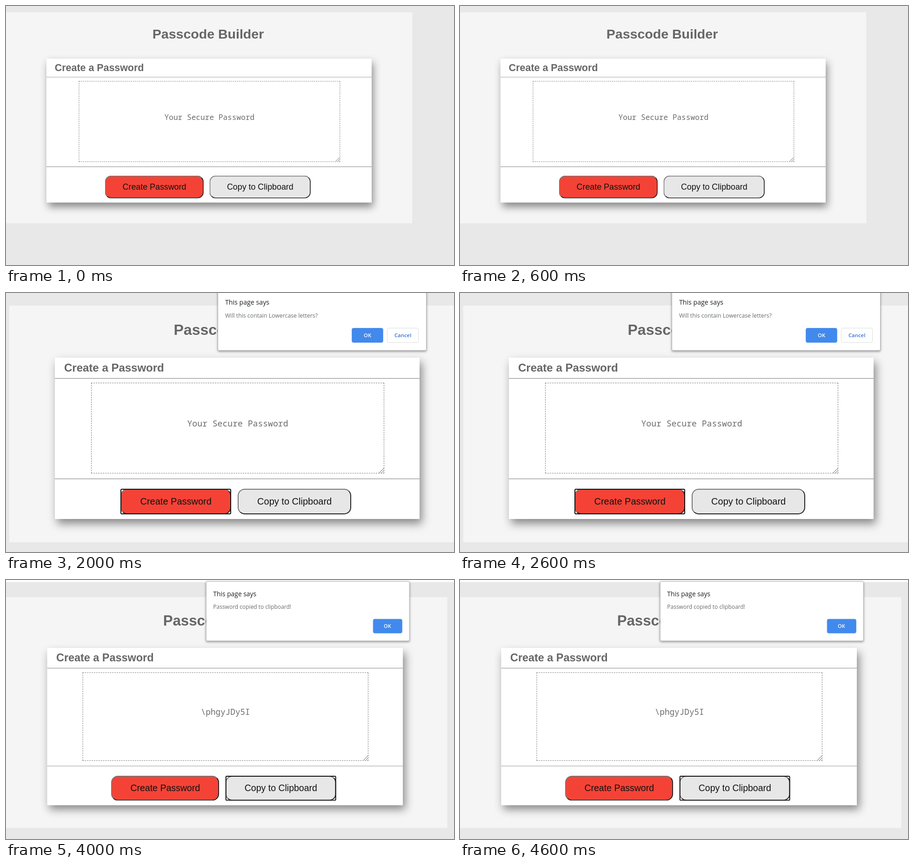
Recreate the animation shown at these times as an HTML page. Size 963x557 px, loop 5 s.

```html
<!DOCTYPE html>
<html lang="en">
<head>
<meta charset="utf-8">
<title>Password tool walkthrough</title>
<style>
  html, body { margin: 0; width: 100%; height: 100%; overflow: hidden; background: #e8e8e8; }
  #stage { position: relative; width: 100%; height: 100%; overflow: hidden; contain: strict; }
  #page { position: absolute; left: 0; top: 0; transform-origin: 0 0; }
  #page * { position: absolute; box-sizing: border-box; }
  #page, .btn { font: 20px "Liberation Sans", Arial, sans-serif; color: #111; }
  .line { line-height: 20px; white-space: pre; }
  .ui { font-family: "Open Sans", "Noto Sans", sans-serif; }

  #toolbar { left: -300px; top: -244px; width: 1500px; height: 100px; background: #fdfdfd; border-bottom: 1px solid #e4e4e4; }
  #address { left: -188px; top: -171px; font-size: 13.1px; color: #444; }
  #panel { left: -98px; top: -112px; width: 980px; height: 509px; background: #f5f5f5; }
  #title { left: 255.5px; top: -70.5px; font-size: 32px; font-weight: bold; color: #666; }

  #card { left: 0; top: 0; width: 784px; height: 347px; background: #fff; box-shadow: 5px 10px 18px #888; }
  #heading { left: 20px; top: 11.7px; font-size: 24px; font-weight: bold; color: #666; }
  .rule { left: 0; width: 784px; height: 2px; border: solid #8e8e8e; border-width: 1px 0; border-bottom-color: #e4e4e4; }
  #field { left: 78px; top: 54px; width: 630px; height: 195px; border: 1px dashed #777; }
  #field svg { right: 0; bottom: 0; }
  #secret { left: 78px; top: 131.2px; width: 630px; text-align: center; font: 18.1px/20px "Noto Sans Mono", "DejaVu Sans Mono", monospace; color: #6c6c6c; }

  .btn { top: 282.3px; height: 55px; line-height: 51px; text-align: center; border-radius: 15px;
    border: 2px solid; border-color: #767676 #222 #222 #767676; }
  #create { left: 141.2px; width: 238px; background: #f44336; }
  #copy { left: 393px; width: 244.3px; background: #e7e7e7; }
  .focus::after { content: ""; position: absolute; inset: -2px; border: 2px solid #101010; border-radius: 3px; }

  #dialog { left: 349.6px; top: -147px; width: 449px; height: 131.5px; background: #fff;
    border: 1px solid #b4b4b4; border-radius: 3px; box-shadow: 0 2px 5px rgba(0, 0, 0, .4); }
  #says { left: 15.3px; top: 17px; font-size: 14.2px; color: #202124; }
  #message { left: 15.3px; top: 46px; font-size: 12.3px; color: #666a6e; }
  #input { left: 15px; top: 93px; width: 417px; height: 33px; border: 2px solid #9cc2f0; border-radius: 3px; }
  #input i { left: 7px; top: 6px; width: 1.2px; height: 17px; background: #222; }
  .answer { bottom: 15.5px; width: 68px; height: 32px; line-height: 30px; font-size: 11.4px; font-weight: 600;
    text-align: center; border: 1px solid #dadce0; border-radius: 4px; }
  #ok { left: 287.5px; background: #4189ec; border-color: #6ca4f0; color: #fff; }
  #cancel { left: 363.5px; color: #3871d8; }

  .prompt #card, .prompt #dialog { background: #fcfcfc; }
  .prompt #dialog { height: 199px; }
  .prompt #ok { background: #1a73e8; border-color: #1a73e8; }
  .alert #ok { left: 367px; width: 65px; }
  .alert #cancel, .plain #dialog, #input { display: none; }
  .prompt #input { display: block; }
</style>
</head>
<body>
<div id="stage">
  <div id="page">
    <div id="toolbar"></div>
    <div id="address" class="line ui">Users/Tavish%20Lok/OneDrive/Desktop/Password_Maker/index.html</div>
    <div id="panel"></div>
    <div id="title" class="line">Passcode Builder</div>
    <div id="card">
      <div id="heading" class="line">Create a Password</div>
      <div class="rule" style="top:44px"></div>
      <div id="field">
        <svg width="10" height="10" fill="none" stroke="#555"><path d="M0 10 10 0M5 10 10 5"/></svg>
      </div>
      <div id="secret" class="line"></div>
      <div class="rule" style="top:260px"></div>
      <div id="create" class="btn">Create Password</div>
      <div id="copy" class="btn">Copy to Clipboard</div>
    </div>
    <div id="dialog" class="ui">
      <div id="says" class="line">This page says</div>
      <div id="message" class="line"></div>
      <div id="input"><i></i></div>
      <div id="ok" class="answer">OK</div>
      <div id="cancel" class="answer">Cancel</div>
    </div>
  </div>
</div>
<script>
const $ = id => document.getElementById(id);
const HINT = "Your Secure Password", SECRET = "\\phgyJDy5I";
const SHOT_MS = 1000;

// x, y: top left of the card on the stage; width: its width there
const shots = [
  { x: 87, y: 113.3, width: 699, kind: "plain", text: HINT },
  { x: 170, y: 160, width: 717, kind: "prompt", text: HINT, focus: "create",
    message: "How many characters would you like your password? Choose between\n8 and 128" },
  { x: 105, y: 139, width: 784, kind: "confirm", text: HINT, focus: "create",
    message: "Will this contain Lowercase letters?" },
  { x: 70.5, y: 119.5, width: 774.5, kind: "plain", text: SECRET, focus: "create" },
  { x: 88.5, y: 146, width: 764.5, kind: "alert", text: SECRET, focus: "copy",
    message: "Password copied to clipboard!" },
];

let current;
function show(shot) {
  if (shot === current) return;
  current = shot;
  const page = $("page");
  page.className = shot.kind;
  page.style.transform = `translate(${shot.x}px, ${shot.y}px) scale(${shot.width / 784})`;
  $("secret").textContent = shot.text;
  $("message").textContent = shot.message || "";
  for (const id of ["create", "copy"]) $(id).classList.toggle("focus", shot.focus === id);
}

const start = performance.now();
function tick() {
  const elapsed = performance.now() - start;
  show(shots[Math.floor(elapsed / SHOT_MS) % shots.length]);
  requestAnimationFrame(tick);
}
tick();
</script>
</body>
</html>
```
